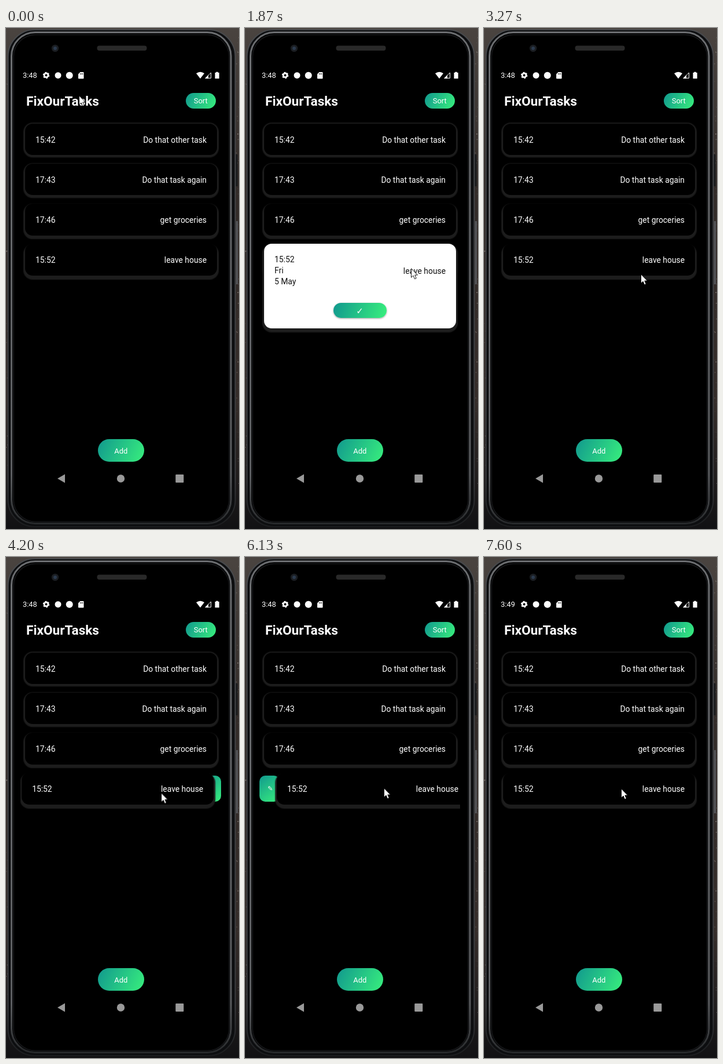
An HTML page that plays this animation: 403 by 864 pixels, repeating every 8 s.

```html
<!DOCTYPE html>
<html lang="en">
<head>
<meta charset="utf-8">
<title>FixOurTasks</title>
<style>
  html, body { margin: 0; width: 100%; height: 100%; overflow: hidden; background: #000; }
  #stage { position: relative; width: 403px; height: 864px; overflow: hidden;
    font: 13.85px/20px Roboto, sans-serif; color: #fff; }
  #stage * { position: absolute; box-sizing: border-box; white-space: nowrap; }
  #stage svg * { position: static; }
  #phone { left: 0; top: 0; }

  h1 { margin: 0; left: 35px; top: 112px; font-size: 22.6px; line-height: 30px; }
  .clock { left: 29px; top: 72px; font-size: 12.8px; }
  .pill { background: linear-gradient(var(--tilt), #11998e, #38ef7d); text-align: center; font-size: 13px; }
  .sort { --tilt: 117deg; left: 311px; top: 112px; width: 51.5px; height: 26.5px; border-radius: 14px; line-height: 28px; }
  .add { --tilt: 116deg; left: 158.5px; top: 709px; width: 80.5px; height: 39px; border-radius: 20px; line-height: 41px; }

  .row { left: 25px; width: 347px; height: 55px; clip-path: inset(-8px 0 -110px); }
  .card { left: 8px; top: 0; width: 332px; height: 54.5px; border-radius: 13px; background: #000;
    box-shadow: 0 var(--drop) 1.5px 3px #1d1d1d; }
  .card .time { left: 18px; top: 18px; }
  .card .task { right: 18px; top: 18px; }
  .open { height: 145.5px; background: #fff; color: #111; visibility: hidden; animation: open 8s step-end infinite; }
  .open .time { line-height: 18.8px; }
  .open .task { top: 37px; }
  .done { --tilt: 106deg; left: 119.5px; top: 101.5px; width: 92px; height: 26px; border-radius: 13px;
    font: 15px/28px "DejaVu Sans", sans-serif; color: #fff; box-shadow: 0 1px 3px #0006; }
  .side { --tilt: 142deg; top: 5px; width: 35px; height: 45px; border-radius: 10px; line-height: 46px; visibility: hidden; }
  .edit { left: 0; padding-left: 2px; font: 11px/46px "DejaVu Sans", sans-serif; animation: edit 8s step-end infinite; }
  .remove { right: 0; animation: remove 8s step-end infinite; }
  .slide { animation: slide 8s linear infinite; }
  .early { animation: early 8s step-end infinite; }
  .late { visibility: hidden; animation: late 8s step-end infinite; }
  #cursor { left: -1px; top: -1px; animation: cursor 8s linear infinite; }

  @keyframes open { 0% { visibility: hidden } 15% { visibility: visible } 40.875%, 100% { visibility: hidden } }
  @keyframes remove { 0% { visibility: hidden } 51.625% { visibility: visible } 74.1%, 100% { visibility: hidden } }
  @keyframes edit { 0% { visibility: hidden } 74.1% { visibility: visible } 94.97%, 100% { visibility: hidden } }
  @keyframes early { 0% { visibility: visible } 82.5%, 100% { visibility: hidden } }
  @keyframes late { 0% { visibility: hidden } 82.5%, 100% { visibility: visible } }

  @keyframes slide {
    0% { transform: none }
    51.625% { transform: translateX(0); animation-timing-function: steps(12, start) }
    61.625% { transform: translateX(-35px) }
    69.95% { transform: translateX(-35px); animation-timing-function: steps(9, start) }
    77.45% { transform: translateX(22px) }
    77.5% { transform: translateX(22px); animation-timing-function: steps(3, start) }
    80% { transform: translateX(35px) }
    90% { transform: translateX(35px); animation-timing-function: steps(7, start) }
    95.8%, 100% { transform: translateX(0) }
  }

  @keyframes cursor {
    0% { transform: translate(127px, 117px) }
    .875% { transform: translate(127px, 117px); animation-timing-function: steps(10, start) }
    9.2%, 13.375% { transform: translate(209px, 432px); animation-timing-function: steps(2, start) }
    14.875% { transform: translate(220px, 404px); animation-timing-function: step-end }
    15% { transform: translate(236px, 396px) }
    17.5% { transform: translate(236px, 396px); animation-timing-function: steps(8, start) }
    24.2% { transform: translate(288px, 415px); animation-timing-function: steps(4, start) }
    27.5% { transform: translate(270px, 410px) }
    28.375% { transform: translate(270px, 410px); animation-timing-function: steps(7, start) }
    34.2% { transform: translate(237px, 480px) }
    35.875% { transform: translate(237px, 480px); animation-timing-function: steps(4, start) }
    39.2% { transform: translate(263px, 413px); animation-timing-function: step-end }
    40.875% { transform: translate(272px, 425px) }
    41.625% { transform: translate(272px, 425px); animation-timing-function: steps(12, start) }
    51.625% { transform: translate(275px, 408px); animation-timing-function: steps(12, start) }
    61.625% { transform: translate(240px, 404px) }
    66.625% { transform: translate(240px, 404px); animation-timing-function: steps(4, start) }
    69.95% { transform: translate(188px, 437px); animation-timing-function: steps(9, start) }
    77.45% { transform: translate(241px, 399px) }
    77.5% { transform: translate(241px, 399px); animation-timing-function: steps(12, start) }
    87.4% { transform: translate(273px, 437px) }
    90% { transform: translate(273px, 437px); animation-timing-function: steps(7, start) }
    95.8%, 100% { transform: translate(238px, 400px) }
  }
</style>
</head>
<body>
<div id="stage">
  <svg id="phone" width="403" height="864">
    <defs>
      <linearGradient id="sky" x2="0" y2="1">
        <stop offset="0" stop-color="#4a4440"/><stop offset=".3" stop-color="#332c29"/>
        <stop offset=".75" stop-color="#352d2a"/><stop offset="1" stop-color="#111113"/>
      </linearGradient>
      <linearGradient id="rim" x2="0" y2="1">
        <stop offset="0" stop-color="#484a4d"/><stop offset=".9" stop-color="#3a3c3f"/><stop offset="1" stop-color="#1b1c1e"/>
      </linearGradient>
      <linearGradient id="edge" x2="0" y2="1">
        <stop offset="0" stop-color="#6c6e71"/><stop offset=".9" stop-color="#5b5d60"/><stop offset="1" stop-color="#27292b"/>
      </linearGradient>
    </defs>
    <rect width="403" height="864" fill="url(#sky)"/>
    <g id="stars" fill="#a79d96"/>
    <rect x="397" y="218" width="3.5" height="55" fill="#191a1c"/>
    <rect x="398" y="333" width="3" height="109" fill="#55565a"/>
    <rect x="3.5" y="3" width="393" height="857" rx="46" fill="#0d0e10" stroke="url(#rim)" stroke-width="2"/>
    <rect x="9.5" y="7.5" width="379.5" height="847" rx="41" stroke="url(#edge)" stroke-width="3"/>
    <rect x="13" y="11.5" width="373" height="840" rx="38" stroke="#141517" stroke-width="2"/>
    <circle cx="85" cy="35" r="6.2" fill="#1b1e22"/>
    <circle cx="85" cy="35" r="3" fill="#2b3a4d"/>
    <rect x="157.5" y="30.5" width="86" height="8.5" rx="4" fill="#292929"/>
    <g fill="#fff">
      <circle cx="69.5" cy="81.5" r="3.4" fill="none" stroke="#fff" stroke-width="2.8"/>
      <circle cx="69.5" cy="81.5" r="4.9" fill="none" stroke="#fff" stroke-width="1.8" stroke-dasharray="2.6 2.53"/>
      <circle cx="90" cy="81.7" r="5.5"/>
      <circle cx="109.7" cy="81.7" r="6"/>
      <path d="M128.5 76h5a1 1 0 0 1 1 1v9.5a1 1 0 0 1-1 1h-7.5a1 1 0 0 1-1-1v-7z"/>
      <path d="M128.5 78v2.3M130.5 78v2.3M132.5 78v2.3" stroke="#000" stroke-width=".9"/>
      <path d="M329 78.3q7-5 14 0l-7 9z"/>
      <path d="M345 86.5L354.5 77v9.5z" fill="none" stroke="#fff"/>
      <path d="M344 87.2l6-6v6z"/>
      <path d="M363.3 75.7h3.4V77h2v10.3h-7.2V77h1.8z"/>
    </g>
    <g fill="#999">
      <path d="M89 777l13-7.5v15z"/>
      <circle cx="198.5" cy="777" r="6.7"/>
      <rect x="293.3" y="770" width="14" height="14" rx="1"/>
    </g>
  </svg>

  <span class="clock early">3:48</span>
  <span class="clock late">3:49</span>
  <h1>FixOurTasks</h1>
  <div class="pill sort">Sort</div>

  <div class="row" style="top:164.5px; --drop:1.3px">
    <div class="card"><span class="time">15:42</span><span class="task">Do that other task</span></div>
  </div>
  <div class="row" style="top:233.8px; --drop:2.2px">
    <div class="card"><span class="time">17:43</span><span class="task">Do that task again</span></div>
  </div>
  <div class="row" style="top:303.1px; --drop:3.1px">
    <div class="card"><span class="time">17:46</span><span class="task">get groceries</span></div>
  </div>
  <div class="row" style="top:372.4px; --drop:4px">
    <div class="pill side edit">✎</div>
    <div class="pill side remove">X</div>
    <div class="card slide"><span class="time">15:52</span><span class="task">leave house</span></div>
    <div class="card open">
      <span class="time">15:52<br>Fri<br>5 May</span><span class="task">leave house</span>
      <div class="pill done">✓</div>
    </div>
  </div>

  <div class="pill add">Add</div>
  <svg id="cursor" width="13" height="20">
    <path d="M.5 .8V16.2L4 13l2.5 5.800 2.7-1.2L6.8 12h4.700z" fill="#fff" stroke="#000" stroke-width=".9"/>
  </svg>
</div>
<script>
  // Seeded specks for the strip of sky around the phone
  let seed = 7;
  const random = () => (seed = seed * 16807 % 2147483647) / 2147483647;
  let specks = '';
  for (let i = 0; i < 70; i++) {
    const x = random() < .75 ? 398 + random() * 5 : random() * 3;
    specks += `<circle cx="${x}" cy="${random() * 790}" r="${.3 + random() * .6}" opacity="${.2 + random() * .6}"/>`;
  }
  document.getElementById('stars').innerHTML = specks;
</script>
</body>
</html>
```
